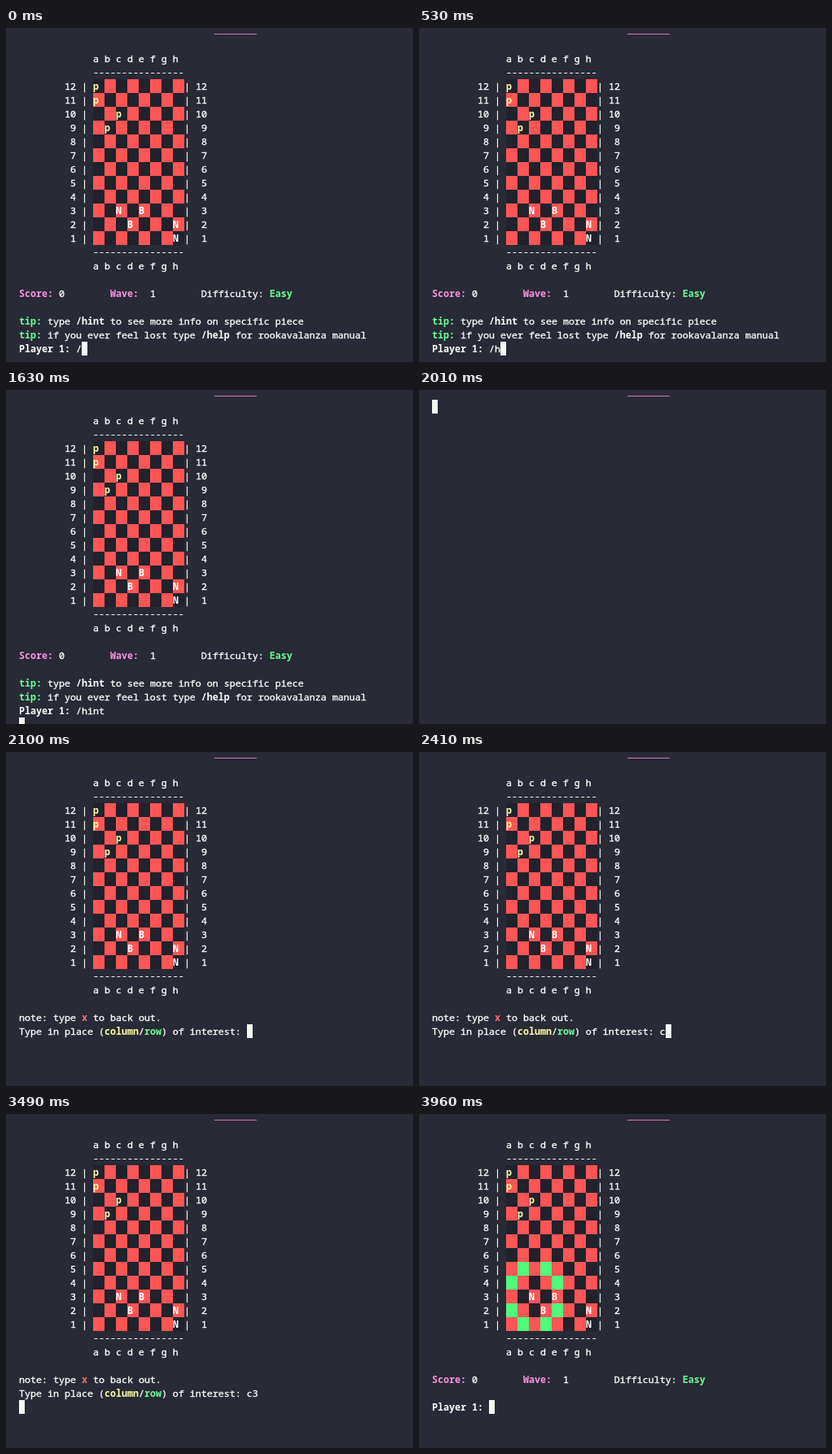
An HTML page that plays this animation: 500 by 411 pixels, repeating every 6.13 s.

```html
<!DOCTYPE html>
<html lang="en">
<head>
<meta charset="utf-8">
<title>Terminal chess</title>
<style>
  html, body { margin: 0; height: 100%; overflow: hidden; background: #282a36; }
  body::before { content: ""; position: absolute; left: 256px; top: 7px; width: 52px; height: 1px; background: #d873b4; }
  pre {
    margin: 0; padding: 12px 16px; color: #fcfcf8;
    font: 11.6667px/17px "Noto Sans Mono", "DejaVu Sans Mono", monospace;
    font-variant-ligatures: none;
    -webkit-text-stroke: .35px;
  }
  b { -webkit-text-stroke: 0; }
  .sq, .cursor { display: inline-block; height: 17px; vertical-align: top; }
  .sq { width: 14px; background: #21222c; }
  .sq.odd { background: #ff5555; }
  .sq.move { background: #50fa7b; }
  .cursor { width: 7px; background: #f8f8f2; }
  .white { color: #fff; }
  .yellow { color: #ffffa5; }
  .green { color: #69ff94; }
  .pink { color: #ff92df; }
  .red { color: #ff6e6e; }
  .rule { position: relative; top: -1px; }
</style>
</head>
<body>
<pre id="screen"></pre>
<script>
const LOOP = 6130;
const FILES = 'abcdefgh';
const PIECES = { a12: 'p', a11: 'p', c10: 'p', b9: 'p', c3: 'N', e3: 'B', d2: 'B', h2: 'N', h1: 'N' };
const CURSOR = '<span class="cursor"></span>';

const bold = (color, text) => `<b class="${color}">${text}</b>`;
const indent = ' '.repeat(13);

function square(file, rank, knight) {
  const piece = PIECES[FILES[file] + rank];
  const reach = knight && Math.abs((file - knight[0]) * (rank - knight[1])) === 2;
  const kind = reach ? 'move' : (file + rank) % 2 ? 'odd' : '';
  const text = piece ? bold(piece === 'p' ? 'yellow' : 'white', piece) : '';
  return `<span class="sq ${kind}">${text}</span>`;
}

function board(knight) {
  const letters = indent + [...FILES].join(' ');
  const rule = `${indent}<span class="rule">${'-'.repeat(16)}</span>`;
  const lines = ['', letters, rule];
  for (let rank = 12; rank > 0; rank--) {
    const label = String(rank).padStart(2);
    const row = [...FILES].map((_, file) => square(file, rank, knight)).join('');
    lines.push(`${' '.repeat(8)}${label} |&nbsp;${row}| ${label}`);
  }
  return [...lines, rule, letters, '', ''].join('\n');
}

const status = `${bold('pink', 'Score:')} 0        ${bold('pink', 'Wave:')}  1        Difficulty: ${bold('green', 'Easy')}\n\n`;
const tip = text => `${bold('green', 'tip:')} ${text}\n`;
const prompt = bold('white', 'Player 1:') + ' ';
const tips = tip(`type ${bold('white', '/hint')} to see more info on specific piece`)
  + tip(`if you ever feel lost type ${bold('white', '/help')} for rookavalanza manual`);
const question = `note: type ${bold('red', 'x')} to back out.\n`
  + `Type in place (${bold('yellow', 'column')}/${bold('green', 'row')}) of interest: `;

const command = typed => board() + status + tips + prompt + typed + CURSOR;
const ask = typed => board() + question + typed + CURSOR;

const steps = [
  [0, command('/')],
  [530, command('/h')],
  [700, command('/hi')],
  [780, command('/hin')],
  [850, command('/hint')],
  [1630, command('/hint\n')],
  [2010, CURSOR],
  [2100, ask('')],
  [2410, ask('c')],
  [3340, ask('c3')],
  [3490, ask('c3\n')],
  [3960, board([2, 3]) + status + prompt + CURSOR],
];

const screenEl = document.getElementById('screen');
const start = performance.now();
let shown;

function draw(now) {
  const t = Math.max(0, now - start) % LOOP;
  const view = steps.findLast(([from]) => t >= from)[1];
  if (view !== shown) screenEl.innerHTML = shown = view;
  requestAnimationFrame(draw);
}
draw(start);
</script>
</body>
</html>
```
